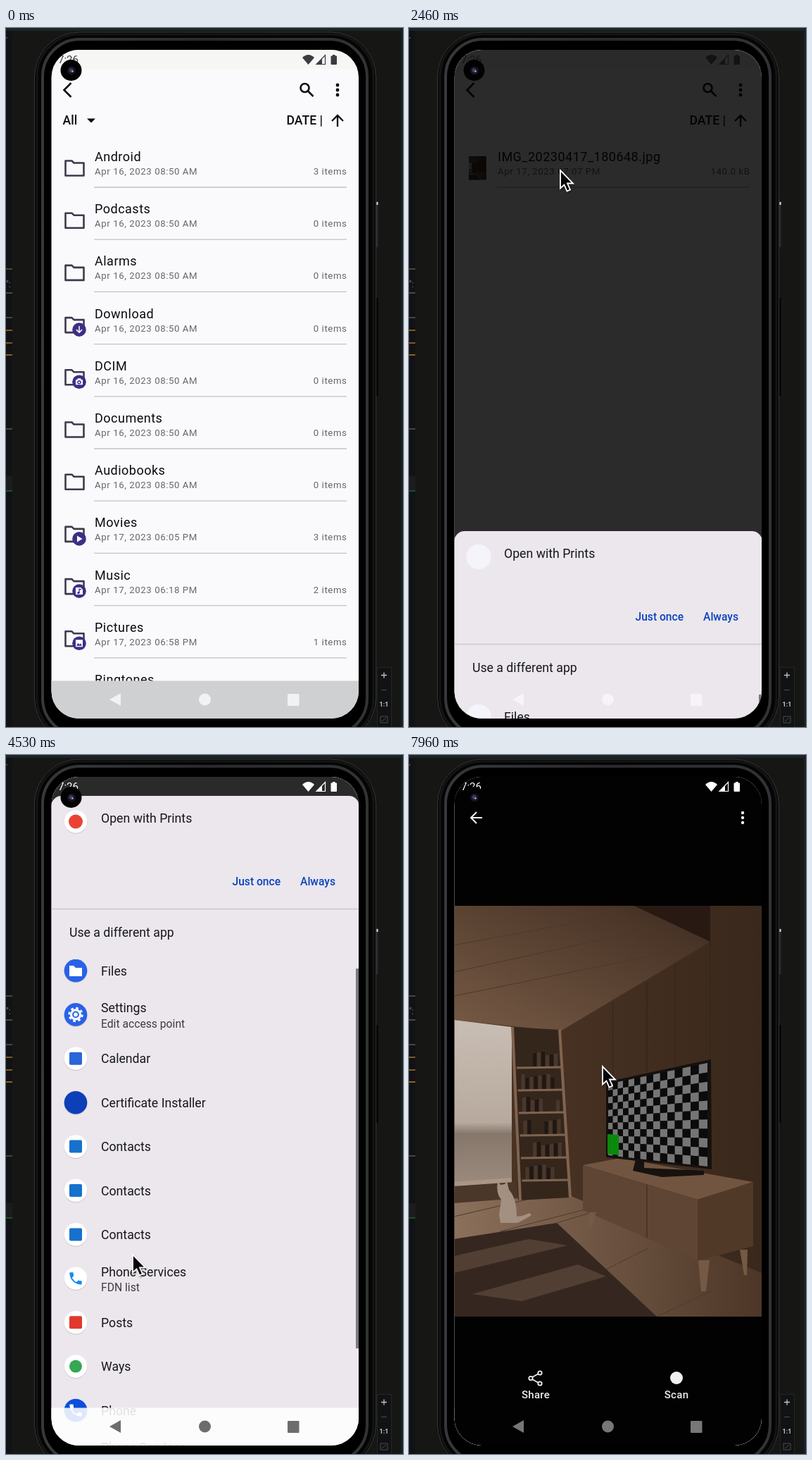
Write an HTML page that moves like this. It is 564x992 px and loops after 8000 ms.

```html
<!DOCTYPE html>
<html lang="en">
<head>
<meta charset="utf-8">
<title>File browser</title>
<style>
html,body{margin:0;width:100%;height:100%;overflow:hidden;background:#161715}
svg{display:block;width:100vw;height:100vh}
text{font-family:Roboto,sans-serif;white-space:pre}
.title{font-size:18px;letter-spacing:.5px;fill:#0b0b0d}
.meta{font-size:13.2px;letter-spacing:.6px;fill:#66666b}
.bold{font-size:17.6px;font-weight:500;fill:#0c0c0e}
.app{font-size:17.7px;fill:#17171b}
.sub{font-size:15.7px;fill:#3c3c42}
.link{font-size:15.6px;font-weight:500;fill:#0b43c0}
.label{font-size:15px;font-weight:500;letter-spacing:.3px;fill:#ececec;text-anchor:middle}
.end{text-anchor:end}
.blank,.loading .icon{display:none}
.loading .blank{display:block}
#cursor{filter:drop-shadow(1px 2px 1px rgba(0,0,0,.35))}
</style>
</head>
<body>
<svg id="stage" viewBox="0 0 564 992" preserveAspectRatio="none">
<defs>
  <clipPath id="screenClip"><rect x="64.5" y="31" width="436.5" height="949" rx="39"/></clipPath>
  <clipPath id="listClip"><rect x="64" y="161" width="438" height="766"/></clipPath>
  <clipPath id="appsClip"><rect x="64" y="290" width="438" height="690"/></clipPath>
  <clipPath id="photoClip"><rect x="64.5" y="214" width="436.5" height="583"/></clipPath>
  <linearGradient id="ceilFill" x1="0" y1="1" x2="1" y2="0">
    <stop offset="0" stop-color="#765a45"/><stop offset="1" stop-color="#3f2c20"/></linearGradient>
  <linearGradient id="wallFill"><stop offset="0" stop-color="#4d3626"/><stop offset="1" stop-color="#3a281c"/></linearGradient>
  <linearGradient id="skyFill" x1="0" y1="0" x2="0" y2="1">
    <stop offset="0" stop-color="#c9beb4"/><stop offset=".63" stop-color="#b7a99d"/>
    <stop offset=".7" stop-color="#86776b"/><stop offset="1" stop-color="#9b8a7c"/></linearGradient>
  <linearGradient id="floorFill"><stop offset="0" stop-color="#8b705b"/><stop offset="1" stop-color="#4d3627"/></linearGradient>
  <linearGradient id="rimFill" x1="0" y1="0" x2="1" y2="0">
    <stop offset="0" stop-color="#37383a"/><stop offset=".5" stop-color="#2a2a2c"/><stop offset="1" stop-color="#323335"/></linearGradient>
</defs>

<rect width="564" height="992" fill="#161715"/>
<rect width="564" height="4" fill="#1d2427"/>
<rect x="561" width="3" height="992" fill="#1b2024"/>
<rect y="4" width="9" height="988" fill="#111215"/>
<rect y="636" width="9" height="21" fill="#1b1c1e"/>
<g id="gutter"></g>
<text x="0" y="368" font-size="12" fill="#77797c">":</text>
<path d="M-2 17l4-4" stroke="#77797c"/>

<rect x="525" y="246" width="3.500" height="65" fill="#2a2b2b"/>
<rect x="526.500" y="247" width="2" height="4" fill="#ddd"/>
<rect x="525" y="383" width="3.500" height="139" fill="#050505"/>
<rect x="40.500" y="6" width="485" height="1008" rx="64" fill="#050505" stroke="#383838"/>
<rect x="44" y="9" width="478" height="1002" rx="60" fill="none" stroke="#151516" stroke-width="3"/>
<rect x="52" y="16" width="461" height="988" rx="53" fill="#000" stroke="url(#rimFill)" stroke-width="4"/>
<g>
  <rect x="527.500" y="907.500" width="20" height="90" fill="#111213" stroke="#232425"/>
  <path d="M533 918.500h8m-4-4v8" stroke="#c4c4c4" stroke-width="1.300"/>
  <path d="M533 939.500h8" stroke="#4c4d4f"/>
  <text x="537" y="963" font-size="9" font-weight="700" fill="#c4c4c4" text-anchor="middle">1:1</text>
  <path d="M532 977h10v9h-10zM534 984l6-5" fill="none" stroke="#4c4d4f"/>
</g>

<g clip-path="url(#screenClip)">
  <rect id="page" x="64" y="31" width="438" height="950"/>
  <rect id="statusBg" x="64" y="31" width="438" height="27"/>
  <g fill="none" stroke="#0c0c0e" stroke-width="2.600">
    <path d="M92.500 78l-10 10 10 10"/>
    <circle cx="424.500" cy="85" r="6"/><path d="M429 89.500l7.500 7.500"/>
    <path d="M471 140v-16m-8 8l8-8 8 8" stroke-width="2.300"/>
  </g>
  <g fill="#0c0c0e"><circle cx="471" cy="81" r="2.400"/><circle cx="471" cy="88" r="2.400"/><circle cx="471" cy="95" r="2.400"/></g>
  <text class="bold" x="398.500" y="137">DATE |</text>
  <g id="browse">
    <text class="bold" x="80.500" y="137">All</text><path d="M115 128.500h12l-6 6z" fill="#0c0c0e"/>
    <g clip-path="url(#listClip)"><g id="folders"></g></g>
  </g>
  <g id="pictures">
    <use href="#photo" transform="translate(81.200 169.800) scale(.0572)"/>
    <g id="picture"></g>
  </g>
  <rect x="64" y="926.500" width="438" height="54" fill="#cfd0d1"/>
  <rect id="scrim" x="64" y="31" width="438" height="950" fill="#000"/>

  <g id="sheet">
    <rect x="64" y="58" width="438" height="1000" rx="15" fill="#ebe7ec"/>
    <g id="opener"></g>
    <text class="link" x="321.500" y="185">Just once</text>
    <text class="link" x="418" y="185">Always</text>
    <path d="M64 218.500h438" stroke="#cac7cd" stroke-width="1.500"/>
    <text class="app" x="90" y="258">Use a different app</text>
    <g clip-path="url(#appsClip)"><g id="apps"></g></g>
    <rect id="thumb" x="497" width="4" height="539" fill="#6c6d76"/>
  </g>
  <rect id="navBg" x="64" y="926.500" width="438" height="54" fill="#fff" opacity=".87"/>

  <g id="viewer">
    <rect x="64" y="31" width="438" height="950" fill="#020203"/>
    <g id="photo" clip-path="url(#photoClip)">
      <rect x="64" y="214" width="438" height="584" fill="url(#wallFill)"/>
      <path d="M290 350V580M338 322V450M378 295V440M428 265V432" stroke="#33231a" fill="none"/>
      <path d="M64 214H320L428 265 378 295 215 392 64 376z" fill="url(#ceilFill)"/>
      <path d="M64 270L300 226M64 308L345 246M64 342L380 278" stroke="#4d382a" fill="none"/>
      <path d="M320 214H428V265z" fill="#281a12"/>
      <path d="M64 632L230 626 501 735V797H64z" fill="url(#floorFill)"/>
      <path d="M64 655L180 628M130 676L250 645M210 664L290 640M352 797L430 760M280 730L340 700" stroke="#513a2b" fill="none"/>
      <path d="M64 376L146 386V607H64z" fill="url(#skyFill)"/>
      <path d="M64 606L146 600V612L64 620z" fill="#ab9685"/>
      <path d="M64 612L150 606 156 629 64 636z" fill="#4a3729"/>
      <path d="M146 386L215 390 229 628 155 632z" fill="#35261c"/>
      <g id="shelves"></g>
      <path d="M147 386l11 246M214 390l15 238" stroke="#80644f" stroke-width="4"/>
      <path d="M126 605l4 5 6-1 3-5 3 13q11 12 11 38l8-1 10-4 3 3-8 5-12 6h-24l-2-11 3-22q-8-9-5-26z" fill="#a39080"/>
      <path d="M64 687L210 664 352 797H64z" fill="#352720"/>
      <path d="M64 711L170 687 225 696 64 735zM90 765L240 723 280 740 160 775z" fill="#765d4b" opacity=".45"/>
      <path d="M247 582L300 572 489 606 410 631z" fill="#725540"/>
      <path d="M247 582L410 631V717L247 646z" fill="#5f4533"/>
      <path d="M410 631L489 606V697L410 718z" fill="#513928"/>
      <path d="M338 610V686" stroke="#3c291d"/>
      <path d="M256 649h10l-7 23h-5zM411 717h16l-5 44h-7zM470 702h11l-1 36h-4z" fill="#755944"/>
      <path d="M322 574h12v12l85 4v6l-60 3-41-9z" fill="#17120f"/>
      <path d="M280 464L429 432 430 588 280 571z" fill="#15110f"/>
      <g id="checks"></g>
      <path d="M282 538l16 1v29l-16-2z" fill="#0a890d"/>
    </g>
    <path d="M104 89H88m8-8l-8 8 8 8" fill="none" stroke="#f2f2f2" stroke-width="2"/>
    <g fill="#f2f2f2"><circle cx="474" cy="82" r="2.200"/><circle cx="474" cy="89" r="2.200"/><circle cx="474" cy="96" r="2.200"/>
      <circle cx="380" cy="884" r="9"/></g>
    <g fill="none" stroke="#ececec" stroke-width="1.800">
      <path d="M175 883l9-5M175 886l9 5"/><circle cx="173" cy="884.500" r="2.700"/>
      <circle cx="186" cy="877" r="2.700"/><circle cx="186" cy="892" r="2.700"/></g>
    <text class="label" x="180" y="913">Share</text>
    <text class="label" x="380" y="913">Scan</text>
  </g>

  <g id="nav"><path d="M163 944v18l-16-9z"/><circle cx="282.500" cy="953" r="8.500"/><rect x="400" y="945" width="16.500" height="17" rx="1"/></g>
  <g id="status">
    <text x="74" y="50" font-size="15">7:26</text>
    <path d="M421 42Q429.500 34 438 42L429.500 52z"/>
    <path d="M453.500 38.500V51.500H441z" fill="none" stroke="currentColor" stroke-width="1.200"/><path d="M441 52l8-8.500V52z"/>
    <rect x="461.500" y="39.500" width="8.500" height="12.500" rx="1"/><rect x="464" y="38" width="3.500" height="3"/>
  </g>
</g>
<circle cx="92.500" cy="60" r="15" fill="#020203"/>
<circle cx="93" cy="60.500" r="6" fill="#15151c"/><circle cx="92.500" cy="60" r="3" fill="#3d3a66"/>
<circle cx="94.500" cy="61.500" r="1.200" fill="#b9b8d0"/>

<g id="cursor"><path d="M0 0V25.500L5.500 20.500 9.500 29.500 14 27.500 10 18.500H18z" fill="#050507" stroke="#fff" stroke-width="1.800"/></g>
</svg>

<script>
const $ = id => document.getElementById(id);
const LOOP = 8000, ROW = 74.2, APP = 62.4;

// ---------- static parts ----------
const text = (cls, x, y, s) => `<text class="${cls}" x="${x}" y="${y}">${s}</text>`;
const path = (d, fill) => `<path d="${d}" fill="${fill}"/>`;
const gutterLines = [[342, '#6b5a3c'], [376, '#6b5f48'], [411, '#5a5b5c'], [429, '#b3771e'],
  [447, '#b3771e'], [464, '#c58118'], [569, '#5a5b5c'], [657, '#1f6a25']];
$('gutter').innerHTML = gutterLines.map(([y, c]) => `<rect y="${y - .7}" width="9" height="1.4" fill="${c}"/>`).join('');

const fileRow = (name, date, info) => text('title', 126, 189, name) + text('meta', 126, 208, date) +
  text('meta end', 484.5, 208, info) + '<path d="M125 226h359" stroke="#c2c2c4" stroke-width="1.3"/>';
const glyphs = {
  down: '<path d="M0-5V4M-4 0L0 4 4 0" fill="none" stroke="#fff" stroke-width="1.5"/>',
  camera: '<path d="M-5-3h2l1-2h4l1 2h2v7H-5z" fill="#fff"/><circle cy=".5" r="2" fill="#fff" stroke="#3f2d86" stroke-width="1.4"/>',
  play: path('M-3-4.500L4.500 0-3 4.500z', '#fff'),
  note: path('M-5-5H2L5-2V5H-5z', '#fff') + '<path d="M0 2.500V-3l3 1" fill="none" stroke="#3f2d86" stroke-width="1.300"/><circle cx="-1" cy="2.500" r="1.700" fill="#3f2d86"/>',
  image: path('M-5-5H5V5H-5z', '#fff') + path('M-4 3.500l2.500-4 2 2.500 1.500-2 2 3.500z', '#3f2d86')
};
const folderIcon = badge => '<path d="M84.500 188.500h9l3 3h14v18h-26z" fill="none" stroke="#3d3a4a" stroke-width="2.600" stroke-linejoin="round"/>' +
  (badge ? `<g transform="translate(104 205.500)"><circle r="9.800" fill="#3f2d86"/>${glyphs[badge]}</g>` : '');
const folders = [['Android', 3], ['Podcasts', 0], ['Alarms', 0], ['Download', 0, 'down'], ['DCIM', 0, 'camera'],
  ['Documents', 0], ['Audiobooks', 0], ['Movies', 3, 'play', '17, 2023 06:05 PM'], ['Music', 2, 'note', '17, 2023 06:18 PM'],
  ['Pictures', 1, 'image', '17, 2023 06:58 PM'], ['Ringtones', 0, '', '17, 2023 06:58 PM'], ['Notifications', 0, '', '17, 2023 06:58 PM']];
$('folders').innerHTML = folders.map(([name, n, badge, date = '16, 2023 08:50 AM'], i) =>
  `<g transform="translate(0 ${i * ROW})">${folderIcon(badge)}${fileRow(name, 'Apr ' + date, n + ' items')}</g>`).join('');
$('picture').innerHTML = fileRow('IMG_20230417_180648.jpg', 'Apr 17, 2023 07:07 PM', '140.0 kB');

const disc = c => `<circle cy=".8" r="16.500" fill="#000" opacity=".16"/><circle r="16.300" fill="${c}"/>`;
const square = c => disc('#fff') + `<rect x="-9" y="-9" width="18" height="18" rx="2" fill="${c}"/>`;
const handset = c => `<path transform="translate(-11.500 -11.500) scale(.96)" fill="${c}" d="M6.620 10.790c1.440 2.830 3.760 5.140 6.590 6.590l2.200-2.200c.27-.27.67-.36 1.020-.24 1.120.37 2.330.57 3.570.57.55 0 1 .45 1 1V20c0 .55-.45 1-1 1-9.390 0-17-7.610-17-17 0-.55.45-1 1-1h3.500c.55 0 1 .45 1 1 0 1.250.2 2.450.57 3.570.11.35.03.74-.25 1.020z"/>`;
const icons = {
  dot: disc('#fff') + '<circle r="10" fill="#ea4335"/>',
  files: disc('#2962e8') + path('M-9-7h6l3 3h9V8H-9z', '#fff'),
  gear: disc('#2962e8') + '<g fill="none" stroke="#fff"><circle r="6.500" stroke-width="3.200"/><circle r="9.300" stroke-width="2.600" stroke-dasharray="3.650"/></g><circle r="2.800" fill="#fff"/>',
  day: square('#2a66d9'),
  robot: disc('#0d3fb8'),
  person: square('#1672cc'),
  call: disc('#fff') + handset('#168af0'),
  mail: square('#e2392c'),
  pin: disc('#fff') + '<circle r="9" fill="#34a853"/>',
  dial: disc('#0b4fdc') + handset('#fff')
};
const appIcon = (key, y) => `<g transform="translate(99 ${y})"><circle class="blank" r="17.800" fill="#f5f4fb"/><g class="icon">${icons[key]}</g></g>`;
const apps = [['Files', 'files'], ['Settings', 'gear', 'Edit access point'], ['Calendar', 'day'], ['Certificate Installer', 'robot'],
  ['Contacts', 'person'], ['Contacts', 'person'], ['Contacts', 'person'], ['Phone Services', 'call', 'FDN list'],
  ['Posts', 'mail'], ['Ways', 'pin'], ['Phone', 'dial'], ['Phone Services', 'call', 'Select contacts to import']];
$('apps').innerHTML = apps.map(([name, key, sub], i) => {
  const y = 321.5 + i * APP;
  return appIcon(key, y) + text('app', 135, y + (sub ? -3.2 : 6.5), name) + (sub ? text('sub', 135, y + 18.5, sub) : '');
}).join('');
$('opener').innerHTML = appIcon('dot', 94.5) + text('app', 135, 96, 'Open with Prints');

// ---------- picture details ----------
const books = [];
for (let r = 0; r < 6; r++) {
  const y = 444 + r * 32, x = 153 + r * 1.5;
  for (let k = 0; k < 9; k++) {
    const h = 18 + (k * 7 + r * 5) % 6;
    if ((k + r * 3) % 11 > 2) books.push(`<rect x="${x + 5 + k * 6}" y="${y - h}" width="5" height="${h}" fill="${k % 2 ? '#1f1713' : '#4a372b'}"/>`);
  }
  books.push(`<path d="M${x} ${y}l${64 + r} -1" stroke="#80644f" stroke-width="3"/>`);
}
$('shelves').innerHTML = books.join('');
const COLS = 15, LINES = 11;
const corner = (c, r) => {
  const u = c / COLS, v = r / LINES, s = .68 * u + .32 * u * u;
  return `${(283 + 141 * s).toFixed(1)} ${(467 - 30 * s + v * (101 + 46 * s)).toFixed(1)}`;
};
let cells = '';
for (let c = 0; c < COLS; c++) for (let r = 0; r < LINES; r++)
  cells += path(`M${corner(c, r)}L${corner(c + 1, r)} ${corner(c + 1, r + 1)} ${corner(c, r + 1)}z`, (c + r) % 2 ? '#0b0b0b' : '#757575');
$('checks').innerHTML = cells;

// ---------- motion ----------
const smooth = p => p * p * (3 - 2 * p);
function track(keys, t) {
  if (t <= keys[0][0]) return keys[0].slice(1);
  for (let i = 1; i < keys.length; i++) {
    const [a, ...from] = keys[i - 1], [b, ...to] = keys[i];
    if (t <= b) {
      const p = smooth((t - a) / (b - a));
      return from.map((v, k) => v + (to[k] - v) * p);
    }
  }
  return keys[keys.length - 1].slice(1);
}
const pointer = [[30, 7, 600], [200, 185, 848], [400, 185, 848], [900, 185, 727], [1560, 185, 727], [1930, 216, 275],
  [2030, 215, 202], [2480, 215, 202], [2760, 182, 860], [2820, 182, 860], [3090, 178, 560], [3200, 178, 580],
  [3400, 176, 760], [3460, 176, 760], [3800, 176, 571], [4060, 176, 571], [4350, 180, 760], [4420, 180, 760],
  [4760, 180, 556], [4860, 182, 540], [5430, 182, 540], [5730, 190, 631], [5900, 190, 740], [6000, 190, 740],
  [6230, 182, 108], [6400, 182, 102], [6600, 182, 102], [6630, 182, 88], [6900, 185, 88], [7200, 333, 181],
  [7560, 333, 181], [7900, 275, 442]];
const press = [[7420, 1], [7440, .45], [7540, .45], [7580, 1]];
const folderScroll = [[420, 0], [960, 121]];
const swap = [[1150, 0], [1270, 1]];
const dim = [[2300, 0], [2420, .83]];
const sheetTop = [[2300, 922], [2440, 656], [2840, 656], [3090, 0]];
const appScroll = [[3480, 0], [3850, 114], [4080, 114], [4370, 0], [4450, 0], [4800, 114], [5690, 114], [5730, 109], [6010, 0]];
const thumbShow = [[2300, .9], [3800, .9], [4000, .55], [4080, .9], [4900, .9], [5200, 0], [5430, 0], [5650, .9], [6050, .9], [6350, 0]];
const viewerShow = [[7500, 0], [7680, 1]];

const shift = (id, x, y, s = 1) => $(id).setAttribute('transform', `translate(${x.toFixed(2)} ${y.toFixed(2)}) scale(${s})`);
const set = (id, name, v) => $(id).setAttribute(name, v);
const show = (id, on) => { $(id).style.display = on ? '' : 'none'; };

function draw(t) {
  const [at] = track(swap, t), [top] = track(sheetTop, t), [off] = track(appScroll, t), [view] = track(viewerShow, t);
  const open = t >= 2300, full = t >= 2950, viewing = view > .5;

  set('page', 'fill', at < .5 ? '#fafafd' : '#fefefd');
  set('statusBg', 'fill', at < .5 ? '#f6f6f4' : '#fbfaff');
  set('browse', 'opacity', 1 - at);
  set('pictures', 'opacity', at);
  shift('folders', 0, -track(folderScroll, t)[0]);

  set('scrim', 'opacity', track(dim, t)[0]);
  show('sheet', open);
  shift('sheet', 0, top);
  shift('apps', 0, -off);
  set('thumb', 'y', 290 + off * 636 / 750);
  set('thumb', 'opacity', track(thumbShow, t)[0]);
  $('stage').classList.toggle('loading', t < 2520);
  show('navBg', full);

  show('viewer', view > 0);
  set('viewer', 'opacity', view);

  const ink = full ? '#fff' : open ? '#131314' : '#3b3c40';
  set('status', 'fill', ink);
  $('status').style.color = ink;
  set('nav', 'fill', viewing ? '#777779' : full ? '#6d6d70' : open ? '#f6f4f8' : '#f2f2f2');

  const [x, y] = track(pointer, t);
  show('cursor', t >= 30);
  shift('cursor', x, y, track(press, t)[0]);
}

const start = performance.now();
function tick() {
  draw((performance.now() - start) % LOOP);
  requestAnimationFrame(tick);
}
tick();
</script>
</body>
</html>
```
